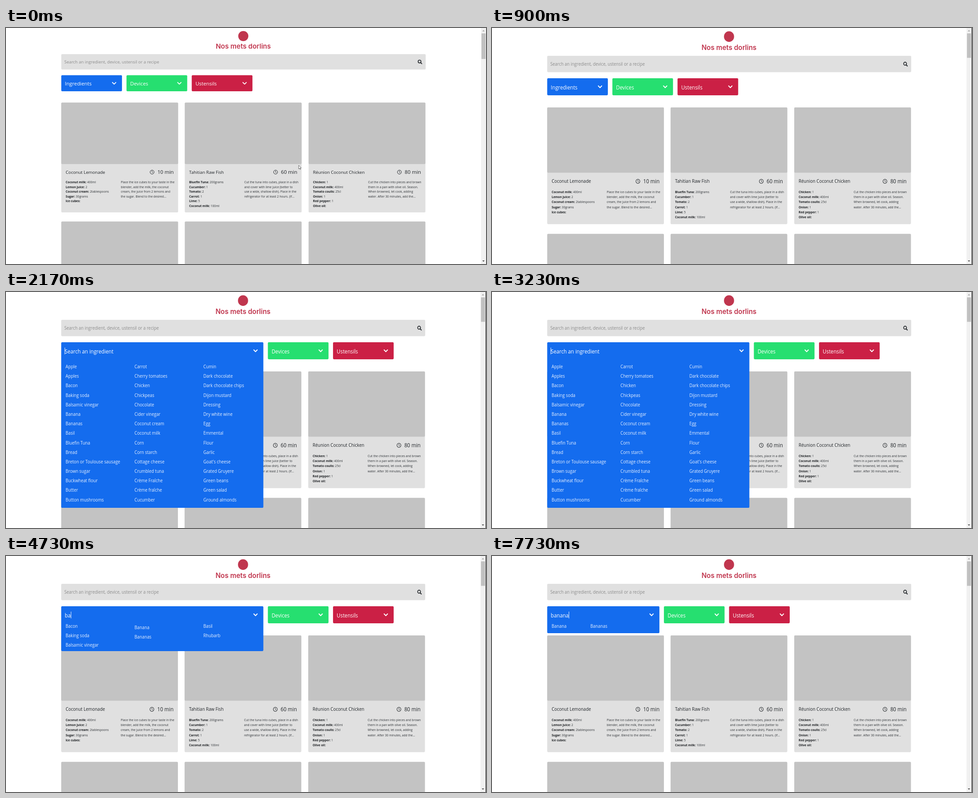
These frames come from a looping animation (1064 px wide and 526 px high, 8 s). An HTML page:

```html
<!DOCTYPE html>
<html lang="en">
<head>
<meta charset="utf-8">
<title>Recipe search</title>
<style>
html, body { margin: 0; width: 100%; height: 100%; overflow: hidden; background: #2b2b2b; }
svg { display: block; width: 1064px; height: 526px; font-family: "Open Sans", "Noto Sans", sans-serif; }
text { white-space: pre; }
.logo { font: 600 15px Inter, sans-serif; fill: #c0364e; text-anchor: middle; }
.hint { font-size: 9.41px; fill: #8b8b8b; }
.label { font-size: 11.27px; fill: #fff; }
.item { font-size: 9.36px; fill: #e9f1fe; }
.title { font-size: 9.6px; font-weight: 500; fill: #212529; }
.time { font-size: 11.3px; font-weight: 500; fill: #212529; text-anchor: end; }
.small { font-size: 6.66px; fill: #2c3034; }
.bold { font-weight: 700; fill: #1c1f22; }
</style>
</head>
<body>
<svg id="stage" viewBox="0 0 1064 526"></svg>
<script>
const LOOP = 8000, ZOOM_AT = 70;
const BLUE = '#146cee', GREEN = '#26df70', RED = '#cb2045';
const LEFT = 122.5, BUTTON_W = 134.6, GAP = 10, BUTTON_Y = 105.3, BUTTON_H = 35.7, ROW = 19.91;
const stage = document.getElementById('stage');

function add(parent, tag, attrs = {}, content) {
  const el = document.createElementNS('http://www.w3.org/2000/svg', tag);
  for (const key in attrs) el.setAttribute(key, attrs[key]);
  if (content !== undefined) el.textContent = content;
  parent.append(el);
  return el;
}
const group = parent => add(parent, 'g');
const rect = (parent, x, y, width, height, fill, rx = 0) =>
  add(parent, 'rect', { x, y, width, height, fill, rx });
const text = (parent, x, y, cls, content) => add(parent, 'text', { x, y, class: cls }, content);
const line = (parent, d, stroke, width) =>
  add(parent, 'path', { d, stroke, 'stroke-width': width, fill: 'none', 'stroke-linecap': 'round', 'stroke-linejoin': 'round' });
const move = (el, x, y = 0) => el.setAttribute('transform', `translate(${x} ${y})`);
const show = (el, on) => el.setAttribute('visibility', on ? 'visible' : 'hidden');

// Page
const page = group(stage);
rect(page, 0, 0, 1064, 526, '#fff');
add(page, 'circle', { cx: 526, cy: 18, r: 11.2, fill: '#c0364e' });
text(page, 526, 45.6, 'logo', 'Nos mets dorlins');
rect(page, LEFT, 58.2, 807.8, 34.4, '#e0e0e0', 2);
text(page, 129.3, 79, 'hint', 'Search an ingredient, device, ustensil or a recipe');
add(page, 'circle', { cx: 916.7, cy: 74.7, r: 3.2, fill: 'none', stroke: '#212529', 'stroke-width': 1.6 });
line(page, 'M919.2 77.2 L921.6 79.6', '#212529', 1.9);

const recipes = [
  { x: 122.5, name: 'Coconut Lemonade', time: 10,
    parts: ['Coconut milk: 400ml', 'Lemon juice: 2', 'Coconut cream: 2tablespoons', 'Sugar: 30grams', 'Ice cubes:'],
    steps: ['Place the ice cubes to your taste in the', 'blender, add the milk, the coconut', 'cream, the juice from 2 lemons and', 'the sugar. Blend to the desired...'] },
  { x: 396.3, name: 'Tahitian Raw Fish', time: 60,
    parts: ['Bluefin Tuna: 200grams', 'Cucumber: 1', 'Tomato: 2', 'Carrot: 1', 'Lime: 5', 'Coconut milk: 100ml'],
    steps: ['Cut the tuna into cubes, place in a dish', 'and cover with lime juice (better to', 'use a wide, shallow dish). Place in the', 'refrigerator for at least 2 hours. (If...'] },
  { x: 670.7, name: 'Réunion Coconut Chicken', time: 80,
    parts: ['Chicken: 1', 'Coconut milk: 400ml', 'Tomato coulis: 25cl', 'Onion: 1', 'Red pepper: 1', 'Olive oil:'],
    steps: ['Cut the chicken into pieces and brown', 'them in a pan with olive oil. Season.', 'When browned, let cook, adding', 'water. After 30 minutes, add the...'] }
];

for (const recipe of recipes) {
  const card = group(page);
  move(card, recipe.x);
  rect(card, 0, 166.3, 259, 244.7, '#e0e0e0', 2);
  rect(card, 0, 166.3, 259, 137, '#c3c3c3', 2);
  rect(card, 0, 431.3, 259, 137, '#c3c3c3', 2);
  text(card, 9.8, 324.5, 'title', recipe.name);
  add(card, 'circle', { cx: 201.3, cy: 321.2, r: 4.4, fill: 'none', stroke: '#212529', 'stroke-width': 1 });
  line(card, 'M201.3 318.6 V321.4 L203 322.6', '#212529', 0.9);
  text(card, 249.3, 325.3, 'time', recipe.time + ' min');
  recipe.parts.forEach((part, i) => {
    const [name, amount] = part.split(':');
    const row = text(card, 9.8, 346 + i * 10.52, 'small', '');
    add(row, 'tspan', { class: 'bold' }, name + ':');
    add(row, 'tspan', {}, amount);
  });
  recipe.steps.forEach((s, i) => text(card, 132, 346 + i * 10.52, 'small', s));
}

// Filter buttons
const chevron = (parent, x = 0) => {
  const el = line(parent, 'M-3.8 -1.9 L0 1.9 L3.8 -1.9', '#fff', 1.9);
  move(el, x, 123.2);
  return el;
};
function button(label, color) {
  const g = group(page);
  rect(g, 0, BUTTON_Y, BUTTON_W, BUTTON_H, color, 2);
  text(g, 8.2, 128.4, 'label', label);
  chevron(g, BUTTON_W - 17.4);
  return g;
}
const devices = button('Devices', GREEN);
const ustensils = button('Ustensils', RED);

const panel = group(page);
move(panel, LEFT);
const panelBox = rect(panel, 0, BUTTON_Y, BUTTON_W, BUTTON_H, BLUE, 2);
const panelText = text(panel, 8, 128.4, 'label', '');
const panelArrow = chevron(panel);
const caret = rect(panel, 0, 116.5, 0.9, 14.2, '#fff');

// Item columns for each filter
const lists = {
  all: { width: 448.6, bottom: 452.3, top: 159.9, gap: 152.9, columns: [
    'Apple,Apples,Bacon,Baking soda,Balsamic vinegar,Banana,Bananas,Basil,Bluefin Tuna,Bread,Breton or Toulouse sausage,Brown sugar,Buckwheat flour,Butter,Button mushrooms',
    'Carrot,Cherry tomatoes,Chicken,Chickpeas,Chocolate,Cider vinegar,Coconut cream,Coconut milk,Corn,Corn starch,Cottage cheese,Crumbled tuna,Crème Fraîche,Crème fraîche,Cucumber',
    'Cumin,Dark chocolate,Dark chocolate chips,Dijon mustard,Dressing,Dry white wine,Egg,Emmental,Flour,Garlic,Goat\'s cheese,Grated Gruyere,Green beans,Green salad,Ground almonds'] },
  b: { width: 448.6, bottom: 278, top: 150.2, gap: 152.9, columns: [
    'Bacon,Baking soda,Balsamic vinegar,Banana,Bananas,Basil,Bluefin Tuna',
    'Bread,Breton or Toulouse sausage,Brown sugar,Buckwheat flour,Butter,Button mushrooms',
    'Crumbled tuna,Cucumber,Green beans,Ground beef,Ice cubes,Rhubarb'] },
  ba: { width: 448.6, bottom: 199.2, top: 150.2, gap: 152.9, shift: 2.8, columns: [
    'Bacon,Baking soda,Balsamic vinegar', 'Banana,Bananas', 'Basil,Rhubarb'] },
  ban: { width: 249, bottom: 161.8, top: 150.2, gap: 86.1, columns: ['Banana', 'Bananas'] },
  none: { width: BUTTON_W, bottom: BUTTON_Y + BUTTON_H, columns: [] }
};
for (const list of Object.values(lists)) {
  list.el = group(panel);
  list.columns.forEach((names, c) => names.split(',').forEach((name, r) =>
    text(list.el, 9.7 + c * list.gap, list.top + r * ROW + (c === 1 ? list.shift || 0 : 0), 'item', name)));
}

const pointer = add(page, 'path', {
  d: 'M0 0 V8.2 L1.9 6.5 L3.2 9.2 L4.4 8.6 L3.2 6 L5.6 5.8 Z',
  fill: '#fff', stroke: '#333', 'stroke-width': 0.7
});

// Scrollbar keeps its height while the page is stretched
const bar = group(stage);
rect(bar, 1053, 0, 11, 526, '#f1f1f1');
const thumb = rect(bar, 1054, 12, 9, 57, '#c1c1c1');
add(bar, 'path', { d: 'M1055.8 7.6 L1058.4 4.6 L1061 7.6 Z', fill: '#a3a3a3' });
add(bar, 'path', { d: 'M1055.8 518 L1058.4 521 L1061 518 Z', fill: '#505050' });

// [start, list, typed text, caret visible]
const steps = [
  [0, 'none', '', false],
  [1100, 'all', '', true], [1630, 'all', '', false],
  [2170, 'all', '', true], [2700, 'all', '', false],
  [3230, 'all', '', true], [3770, 'all', '', false],
  [4030, 'b', 'b', true],
  [4730, 'ba', 'ba', true], [5300, 'ba', 'ba', false],
  [5470, 'ban', 'ban', true], [6030, 'ban', 'ban', false],
  [6230, 'ban', 'bana', true], [6800, 'ban', 'bana', false],
  [7070, 'ban', 'banan', true], [7700, 'ban', 'banan', false],
  [7730, 'ban', 'banana', true]
];
let current;

function applyStep(step) {
  if (step === current) return;
  current = step;
  const [, key, typed, caretOn] = step;
  const list = lists[key];
  for (const k in lists) show(lists[k].el, k === key);
  panelBox.setAttribute('width', list.width);
  panelBox.setAttribute('height', list.bottom - BUTTON_Y);
  panelText.textContent = typed || (key === 'none' ? 'Ingredients' : 'Search an ingredient');
  move(panelArrow, list.width - 17.4, 123.2);
  caret.setAttribute('x', typed ? 8.2 + panelText.getComputedTextLength() : 7.6);
  show(caret, caretOn);
  const next = LEFT + list.width + GAP;
  move(devices, next);
  move(ustensils, next + BUTTON_W + GAP);
}

function movePointer(t) {
  const p = Math.min(1, Math.max(0, (t - 270) / 600));
  const e = p * p * (3 - 2 * p);
  move(pointer, 648.8 - 470 * e, 306 - 178 * e);
  show(pointer, t < 870);
}

function render(t) {
  const zoomed = t >= ZOOM_AT;
  page.setAttribute('transform', zoomed ? 'scale(.9989 1.0637)' : 'scale(1)');
  bar.setAttribute('transform', zoomed ? 'scale(.9989 1)' : 'scale(1)');
  thumb.setAttribute('height', zoomed ? 54.5 : 57);
  applyStep(steps.findLast(s => s[0] <= t));
  movePointer(t);
}

const start = performance.now();
function tick() {
  render((performance.now() - start) % LOOP);
  requestAnimationFrame(tick);
}
tick();
</script>
</body>
</html>
```
